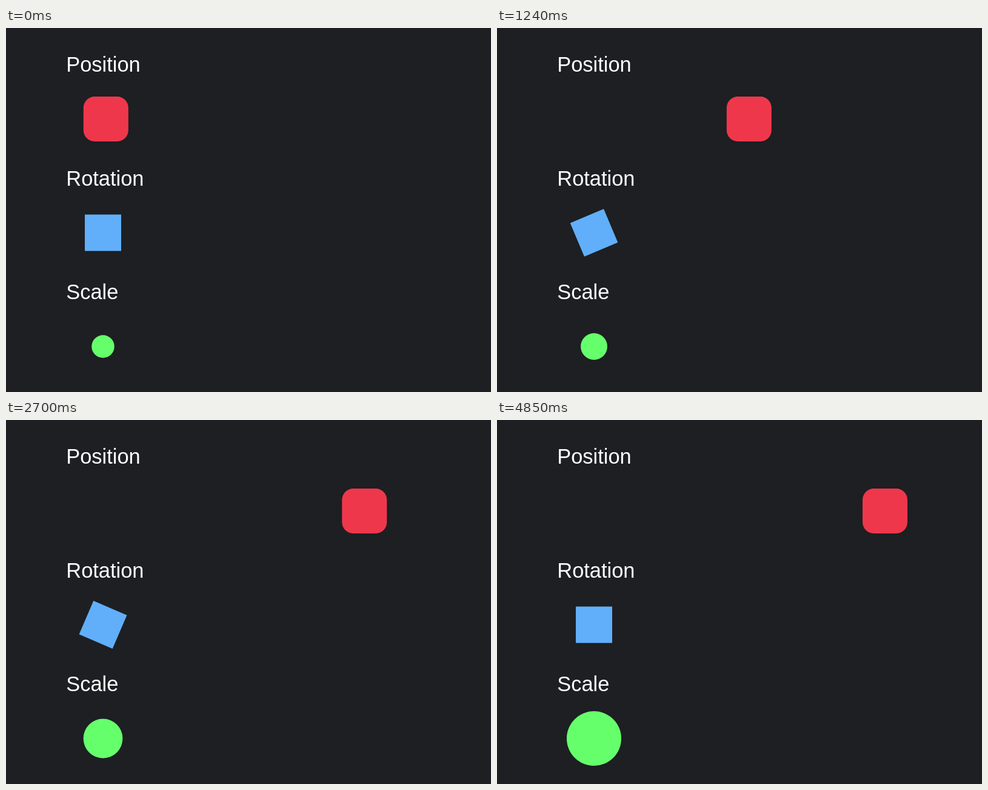
These frames come from a looping animation (800 px wide and 600 px high, 4.88 s). An HTML page with a canvas:

```html
<!DOCTYPE html>
<html lang="en">
<head>
<meta charset="utf-8">
<title>Position, Rotation, Scale</title>
<style>
  html, body { margin: 0; width: 100%; height: 100%; overflow: hidden; background: #1d1f22; }
  canvas { display: block; width: 800px; height: 600px; }
</style>
</head>
<body>
<canvas id="stage" width="800" height="600"></canvas>
<script>
const ctx = document.getElementById('stage').getContext('2d');

const LOOP = 4880;      // ms
const DURATION = 4;     // seconds of movement, then a hold
const LEAD = 0.02;      // the loop opens slightly into the movement
const ROW_GAP = 187.5;

const easeOutQuad = t => 1 - (1 - t) ** 2;
const easeInOutCubic = t => t < 0.5 ? 4 * t ** 3 : 1 - 4 * (1 - t) ** 3;
const easeInSine = t => 1 - Math.cos(t * Math.PI / 2);
const mix = (a, b, p) => a + (b - a) * p;

// The picture advances 33 times a second, on 10 ms ticks.
function progressAt(ms) {
  const step = Math.floor((Math.floor(ms / 10) + 0.5) * 0.33);
  return Math.min(1, (LEAD + step / 32.9) / DURATION);
}

function drawLabels() {
  ctx.fillStyle = '#fff';
  ctx.font = '34.4px "Liberation Sans", Arial, sans-serif';
  ['Position', 'Rotation', 'Scale'].forEach((label, row) => {
    ctx.fillText(label, 99.3, 72 + row * ROW_GAP);
  });
}

function drawMover(t) {
  const x = mix(160, 640, easeOutQuad(t));
  ctx.fillStyle = '#ef374c';
  ctx.beginPath();
  ctx.roundRect(x - 37, 113, 74, 74, 18.5);
  ctx.fill();
}

function drawSpinner(t) {
  ctx.save();
  ctx.translate(160, 150 + ROW_GAP);
  ctx.rotate(-Math.PI * easeInOutCubic(t));
  ctx.fillStyle = '#61affa';
  ctx.fillRect(-30, -30, 60, 60);
  ctx.restore();
}

function drawGrower(t) {
  ctx.fillStyle = '#66ff6c';
  ctx.beginPath();
  ctx.arc(160, 150 + 2 * ROW_GAP, mix(18.75, 45, easeInSine(t)), 0, Math.PI * 2);
  ctx.fill();
}

function render() {
  const t = progressAt(performance.now() % LOOP);
  ctx.fillStyle = '#1d1f22';
  ctx.fillRect(0, 0, 800, 600);
  drawLabels();
  drawMover(t);
  drawSpinner(t);
  drawGrower(t);
  requestAnimationFrame(render);
}

render();
</script>
</body>
</html>
```
